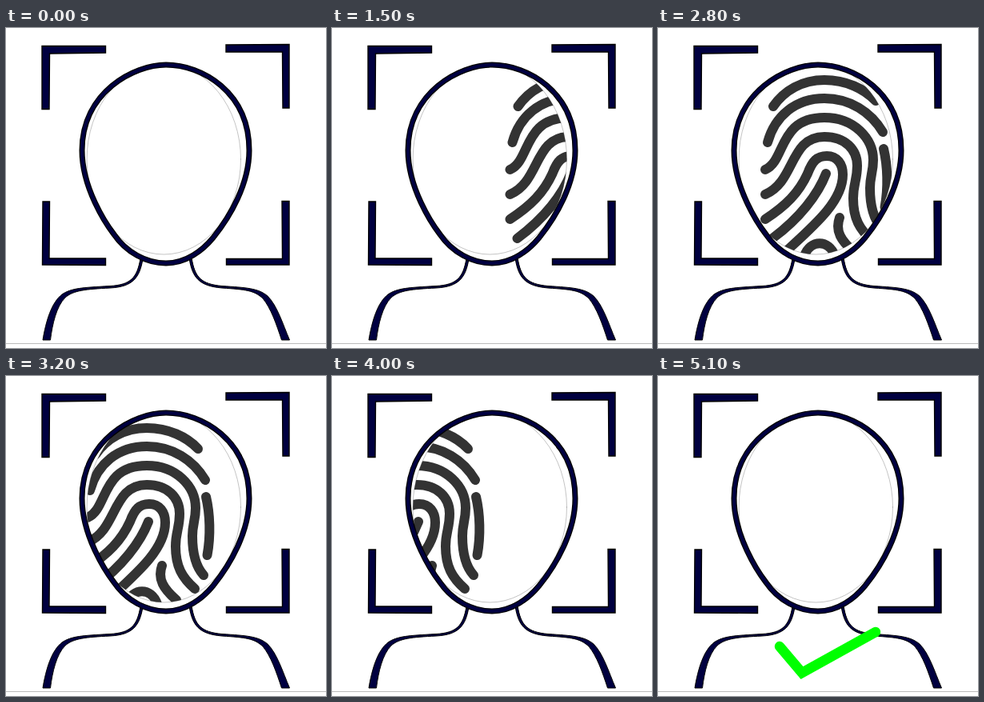
An HTML page for the animation above (5.2 s loop, 400 by 400 pixels).

```html
<!DOCTYPE html>
<html lang="en">
<head>
<meta charset="utf-8">
<title>Face scan</title>
<style>
  html, body { margin: 0; width: 100%; height: 100%; overflow: hidden; background: #fff; }
  svg { display: block; width: 100vw; height: 100vh; }
  .ink { fill: #000040; stroke: #000; stroke-width: 1.4; }
  .line { fill: none; stroke-linecap: round; }
</style>
</head>
<body>
<svg viewBox="0 0 400 400">
  <defs>
    <clipPath id="face"><ellipse cx="197.3" cy="164" rx="96.2" ry="119"/></clipPath>
    <path id="head" d="M200 46C160 46 95 80 95 153C95 200 125 245 135 258C150 280 175 294 200 294C225 294 246 278 259 262C280 236 304 195 304 153C304 80 245 46 200 46Z"/>
  </defs>

  <path d="M0 394.5H400" stroke="#bbb"/>
  <ellipse class="line" cx="197.3" cy="164" rx="96.2" ry="119" stroke="#888" stroke-width=".5"/>

  <g clip-path="url(#face)">
    <g id="print" class="line" stroke="#333" stroke-width="12">
      <path d="M144 98C158 78 180 65 208 65C235 65 258 76 272 91"/>
      <path d="M137 143C146 110 172 88 208 88C240 88 266 105 281 130"/>
      <path d="M134 177C160 166 150 112 208 112C245 112 269 138 269 165C269 180 265 185 265 200C265 222 269 238 279 249"/>
      <path d="M134 208C172 192 164 136 208 136C234 136 249 152 249 172C249 190 244 195 244 213C244 238 252 252 268 266"/>
      <path d="M134 239C160 222 176 206 187 182C193 166 199 160 211 160C224 160 231 170 231 183C231 217 195 247 158 281"/>
      <path d="M210 182C200 208 177 238 143 263"/>
      <path d="M227 237C221 254 229 266 245 280"/>
      <path d="M183 285C190 264 214 264 221 285"/>
      <path d="M282 151C287 172 288 200 283.500 224"/>
    </g>
  </g>

  <g class="ink">
    <g stroke-width="1">
      <path d="M168 288C164 312 156 321 130 322.5C95 324.500 82 325 70 333C57 343 50 366 46 390H55.500C58 370 63 348 74 337C84 328 100 326.500 130 325C159 323.500 167 312 171 289Z"/>
      <path d="M232 287C236 312 244 320 270 322.500C300 324.500 315 325 327 335C339 347 346 370 354.500 390H344.500C338 370 331 350 321 338C310 328 300 327 270 325C241 322.500 233 312 229 288Z"/>
    </g>
    <path d="M45 22.5H124.5V31L54.5 32L54 101.5H45Z"/>
    <path d="M275 21L354 20.5V100H346L345.500 30H275Z"/>
    <path d="M46 217H54.500L54 288H124.500V296.500L45.500 296Z"/>
    <path d="M345 216.500H354V296H275.500V288.500H345.500Z"/>
  </g>
  <use href="#head" class="line" stroke="#000" stroke-width="7"/>
  <use href="#head" class="line" stroke="#000040" stroke-width="4.4"/>

  <path id="check" class="line" d="M152 338L180 371L272 320" stroke="#0f0" stroke-width="12.500" visibility="hidden"/>
</svg>
<script>
  const LOOP = 5200, STEP = 100, CHECK_AT = 5100, HOME = 128;

  // [time in ms, left edge of the fingerprint]
  const slide = [
    [0, 295], [600, 254], [800, 246], [1200, 237], [1800, 196], [2100, 184],
    [2400, 161], [2800, 128], [3000, 113], [3600, 62], [4200, 8], [4400, -10], [5200, -82]
  ];
  const print = document.getElementById('print');
  const check = document.getElementById('check');

  function leftAt(t) {
    const i = slide.findIndex(([end]) => t < end);
    const [t0, x0] = slide[i - 1], [t1, x1] = slide[i];
    return x0 + (x1 - x0) * (t - t0) / (t1 - t0);
  }

  function draw(now) {
    const t = Math.floor((now % LOOP) / STEP) * STEP;
    print.setAttribute('transform', `translate(${leftAt(t) - HOME} 0)`);
    check.setAttribute('visibility', t >= CHECK_AT ? 'visible' : 'hidden');
  }

  const start = performance.now();
  function tick() {
    draw(performance.now() - start);
    requestAnimationFrame(tick);
  }
  tick();
</script>
</body>
</html>
```
